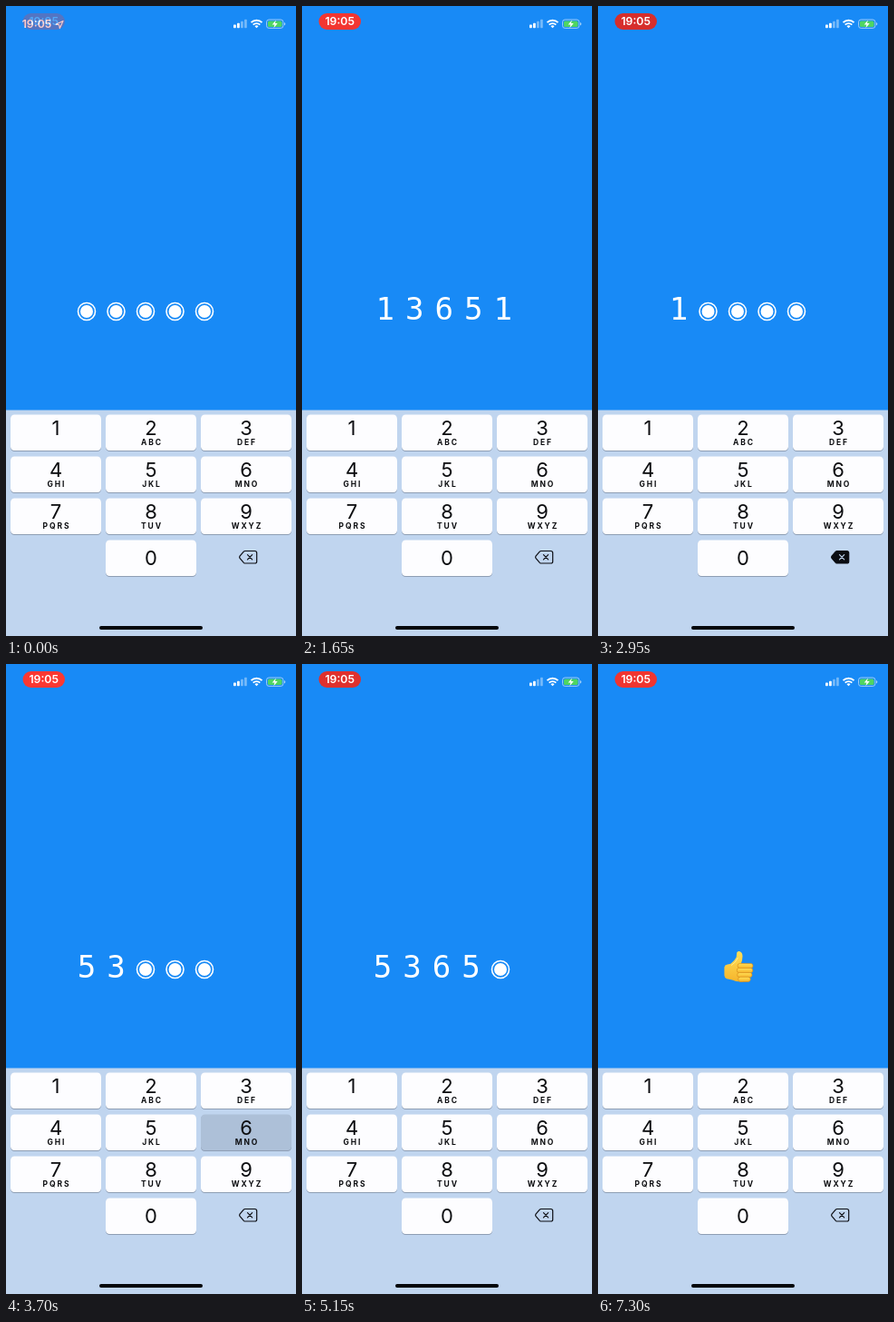
Animation, 320 px wide and 693 px high, one loop 7350 ms. Source, as an HTML page:

```html
<!DOCTYPE html>
<html lang="en">
<head>
<meta charset="utf-8">
<title>Passcode entry</title>
<style>
  html, body { margin: 0; width: 100%; height: 100%; overflow: hidden; background: #188af6; }
  svg { display: block; width: 100%; height: 100%; }
  text { text-anchor: middle; }
  .ui { font-family: Inter, Roboto, sans-serif; }
  .code text { font: 34.1px "DejaVu Sans Mono", "Liberation Mono", monospace; fill: #fff; }
  .digit { font-size: 22px; fill: #0c0d10; }
  .letters { font-size: 8.5px; font-weight: 700; letter-spacing: 1.9px; fill: #0c0d10; }
  .clock { font-size: 12.3px; font-weight: 600; fill: #fff; }
</style>
</head>
<body>
<svg viewBox="0 0 320 693">
  <defs>
    <linearGradient id="skin" x1="0" y1="0" x2="0" y2="1">
      <stop offset="0" stop-color="#ffdf58"/>
      <stop offset="1" stop-color="#f6b52c"/>
    </linearGradient>
  </defs>
  <rect width="320" height="693" fill="#188af6"/>

  <g class="ui">
    <g id="oldClock">
      <text class="clock" x="34" y="24.3">19:05</text>
      <path d="M55 20.2l8-3.8-3.7 8.2-.6-3.8z" fill="none" stroke="#fff" stroke-width="1.1" stroke-linejoin="round"/>
    </g>
    <g id="pill">
      <rect id="pillBox" x="18.5" y="8" width="46.5" height="18" rx="9"/>
      <text class="clock" x="41.7" y="21.4">19:05</text>
    </g>
  </g>

  <g fill="#fff">
    <rect x="251" y="20.5" width="2.8" height="3.7" rx=".7"/>
    <rect x="255" y="18.8" width="2.8" height="5.4" rx=".7"/>
    <rect x="259" y="16.8" width="2.8" height="7.4" rx=".7" opacity=".4"/>
    <rect x="263" y="14.8" width="2.8" height="9.4" rx=".7" opacity=".4"/>
  </g>
  <g fill="none" stroke="#fff" stroke-width="1.9">
    <path d="M270.5 18.2a8.4 8.4 0 0 1 12 0"/>
    <path d="M272.7 20.7a5.3 5.3 0 0 1 7.6 0"/>
    <path d="M276.5 24.3l-2-2.1a2.9 2.9 0 0 1 4 0z" fill="#fff" stroke="none"/>
  </g>
  <rect x="287.5" y="15" width="18.4" height="9.4" rx="2.7" fill="none" stroke="#a9d3f8" stroke-width=".9"/>
  <rect x="288.9" y="16.4" width="15.6" height="6.6" rx="1.5" fill="#4fd562"/>
  <path d="M307 18v3.4q1.3-.4 1.3-1.7t-1.3-1.7z" fill="#a9d3f8"/>
  <path d="M297.9 15.4l-4.2 5h2.7l-1 3.8 4.3-5.1h-2.8z" fill="#fff"/>

  <g id="code" class="code"></g>

  <g id="thumb" fill="url(#skin)">
    <path d="M139.4 333.5Q140 330.8 143 330.6L146.4 329.8Q150.5 326.8 152.7 322.5L153.2 317.6Q153.8 315.6 156 316Q159.3 316.8 159.5 321.4Q159.4 325.5 157.9 329.2L166 330V347.5L159 349.4Q152 349.6 148 347.4L142 346.2Q139.6 345.4 139.4 342.5Z"/>
    <g id="fingers" stroke="#d98f1b" stroke-width=".7"></g>
    <path d="M147 331.5Q152 328.6 154.4 323" fill="none" stroke="#ffeb91" stroke-width="1"/>
  </g>

  <rect y="444.5" width="320" height="248.5" fill="#c0d5ef"/>
  <g id="keys" class="ui"></g>
  <g id="back" stroke="#0b0d12" stroke-width="1.2" stroke-linejoin="round" stroke-linecap="round">
    <path id="backBody" d="M263.8 599.5H274.6Q276.7 599.5 276.7 601.6V610.9Q276.7 613 274.6 613H263.8Q263 613 262.3 612.3L258 607.4Q257.2 606.3 258 605.2L262.3 600.2Q263 599.5 263.8 599.5Z"/>
    <path id="backCross" d="M266.5 603.6l5.2 5.2m0-5.2l-5.2 5.2" fill="none"/>
  </g>
  <rect x="103" y="682" width="114" height="4" rx="2" fill="#05070a"/>
</svg>

<script>
const LOOP = 7350, HOLD = 100, DONE = 5450;
const INK = '#0b0d12', PAPER = '#fdfdff';
const $ = id => document.getElementById(id);

function add(parent, tag, attrs, text) {
  const el = document.createElementNS('http://www.w3.org/2000/svg', tag);
  for (const k in attrs) el.setAttribute(k, attrs[k]);
  if (text) el.textContent = text;
  return parent.appendChild(el);
}

// [time, key]; '<' is backspace
const taps = [
  [550, '1'], [850, '3'], [1180, '6'], [1370, '5'], [1550, '1'],
  [2300, '<'], [2500, '<'], [2700, '<'], [2900, '<'], [3080, '<'],
  [3400, '5'], [3600, '3'], [3800, '6'], [4000, '5'], [4200, '2'],
  [4900, '<'], [5400, '5']
];
const rejected = [1550, 4200];

const letters = ['', 'ABC', 'DEF', 'GHI', 'JKL', 'MNO', 'PQRS', 'TUV', 'WXYZ'];
const keys = {};
function addKey(name, col, row, sub) {
  const x = 5 + col * 105, y = 449.5 + row * 46, mid = x + 50;
  add($('keys'), 'rect', { x, y: y + 1, width: 100, height: 39.4, rx: 4.3, fill: '#8e9eb4' });
  keys[name] = add($('keys'), 'rect', { x, y, width: 100, height: 39.4, rx: 4.3 });
  add($('keys'), 'text', { class: 'digit', x: mid, y: y + (name === '0' ? 27 : 22.4) }, name);
  if (sub) add($('keys'), 'text', { class: 'letters', x: mid + 1, y: y + 33.7 }, sub);
}
letters.forEach((sub, i) => addKey(String(i + 1), i % 3, Math.floor(i / 3), sub));
addKey('0', 1, 3);

const slots = [0, 1, 2, 3, 4].map(i => {
  const cx = 89 + i * 32.5, cy = 336;
  const dot = add($('code'), 'g', {});
  add(dot, 'circle', { cx, cy, r: 9.5, fill: 'none', stroke: '#fff', 'stroke-width': 1.6 });
  add(dot, 'circle', { cx, cy, r: 7, fill: '#fff' });
  return { dot, digit: add($('code'), 'text', { x: cx, y: 345.4 }) };
});

[[154, 329.4, 17], [153.2, 334.4, 17.6], [153.6, 339.4, 16.4], [154.6, 344.2, 13.6]].forEach(
  ([x, y, width]) => add($('fingers'), 'rect', { x, y, width, height: 5.2, rx: 2.6 }));

const show = (el, on) => el.setAttribute('visibility', on ? 'visible' : 'hidden');

function typed(t) {
  return taps.filter(([at]) => at <= t)
    .reduce((s, [, key]) => key === '<' ? s.slice(0, -1) : s + key, '');
}

function pressedKey(t) {
  const tap = taps.find(([at, key]) => {
    const start = key === '<' ? at : at - HOLD;
    return t >= start && t < start + HOLD;
  });
  return tap && tap[1];
}

function shake(t) {
  const start = rejected.find(at => t >= at && t < at + 500);
  return start === undefined ? 0 : 5 * Math.sin((t - start) / 250 * 2 * Math.PI);
}

function drawPill(t) {
  const fade = Math.min(1, 0.25 + t / 200);
  const glow = 0.5 - 0.5 * Math.cos((t - 1050) / 1900 * 2 * Math.PI);
  const mix = (a, b) => Math.round(a + (b - a) * glow);
  $('pillBox').setAttribute('fill', `rgb(${mix(214, 255)},${mix(46, 57)},${mix(44, 51)})`);
  $('pill').setAttribute('opacity', fade);
  $('oldClock').setAttribute('opacity', (1 - fade) / 0.75);
}

function draw(t) {
  const code = typed(t), pressed = pressedKey(t), done = t >= DONE;
  slots.forEach(({ dot, digit }, i) => {
    digit.textContent = done ? '' : code[i] || '';
    show(dot, !done && i >= code.length);
  });
  $('code').setAttribute('transform', `translate(${shake(t)} 0)`);
  show($('thumb'), done);
  for (const name in keys) keys[name].setAttribute('fill', name === pressed ? '#adc0d8' : PAPER);
  $('backBody').setAttribute('fill', pressed === '<' ? INK : 'none');
  $('backCross').setAttribute('stroke', pressed === '<' ? '#c0d5ef' : INK);
  drawPill(t);
}

const begin = performance.now();
function tick() {
  draw((performance.now() - begin) % LOOP);
  requestAnimationFrame(tick);
}
tick();
</script>
</body>
</html>
```
